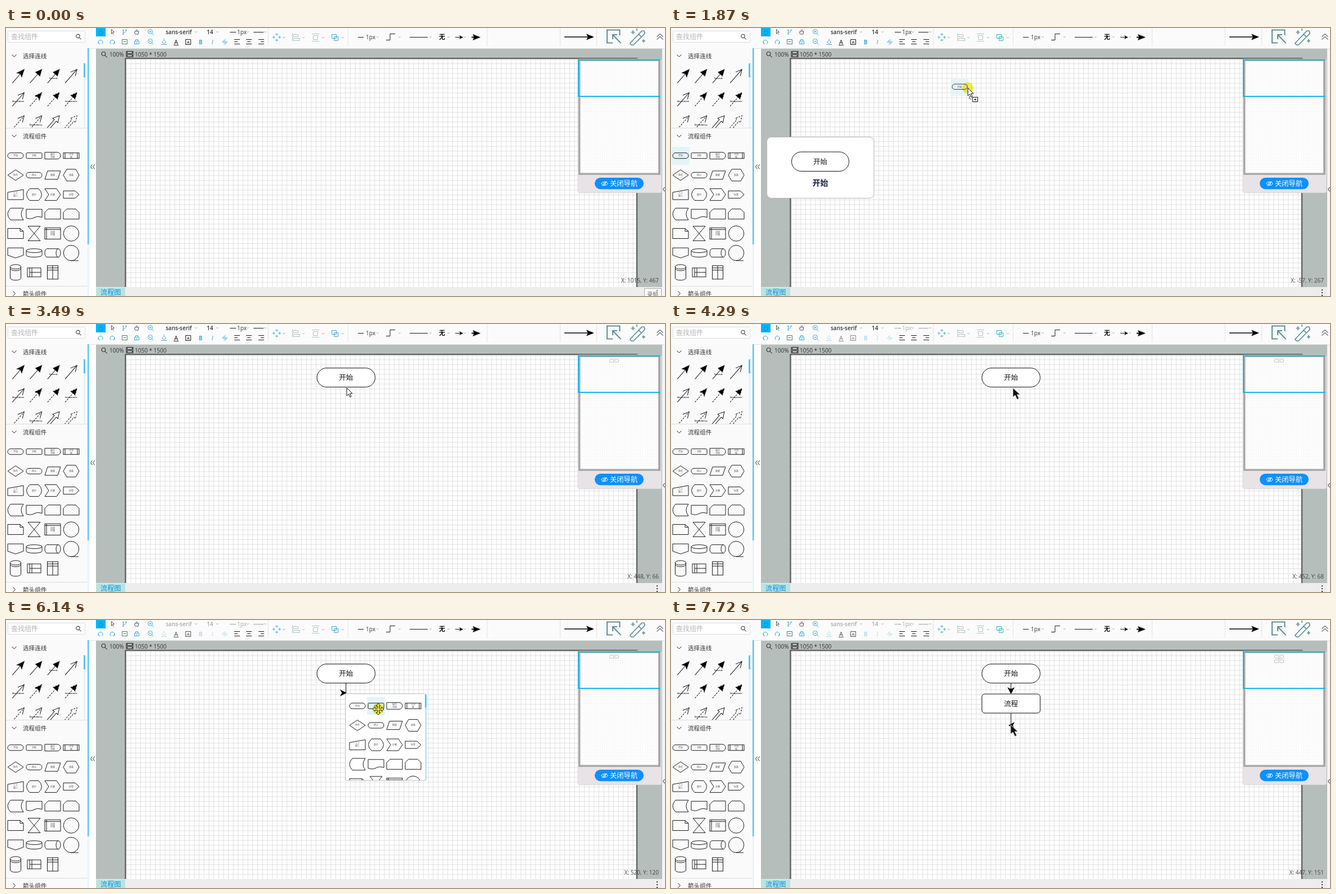
An HTML page for the animation above (7.99 s loop, 1172x478 px).

```html
<!DOCTYPE html>
<html lang="zh">
<head>
<meta charset="utf-8">
<title>流程图</title>
<style>
html, body { margin: 0; width: 100%; height: 100%; overflow: hidden; background: #fafafa; }
svg { display: block; }
text { font-family: "Open Sans", "Noto Sans CJK SC", "Noto Sans CJK", sans-serif; font-size: 10px; fill: #333; }
.zh { font-family: "Noto Sans CJK SC", "Noto Sans CJK", sans-serif; }
.mid { text-anchor: middle; }
.ink { fill: none; stroke: #1a1a1a; stroke-width: 1; }
.ink text { stroke: none; font-size: 4px; fill: #555; }
.solid { fill: #000; }
.blue { fill: none; stroke: #3aa9dc; stroke-width: 1; }
.blue text { stroke: none; fill: #3aa9dc; font-size: 11px; }
.teal { fill: none; stroke: #5d9099; stroke-width: 2; }
.caret { fill: none; stroke: #9aa; stroke-width: .9; }
.node { fill: #fff; stroke: #111; }
.hover { fill: #e3f4f7; }
.panel { fill: #fff; stroke: #b5b8b8; }
</style>
</head>
<body>
<svg id="stage" width="1172" height="478" viewBox="0 0 1172 478">
  <defs>
    <clipPath id="edgeClip"><path d="M0 60H137V178H0z"/></clipPath>
    <clipPath id="pickClip"><path d="M604 132H746V285.500H604z"/></clipPath>
    <pattern id="miniGrid" width="4" height="4" patternUnits="userSpaceOnUse"><path d="M0 .5H4M.5 0V4" stroke="#f7f7f7"/></pattern>
  </defs>

  <!-- workspace -->
  <path fill="#fff" d="M148 37H160V478H148z"/>
  <path fill="#b6bebb" d="M160 37H1167V462H160z"/>
  <path fill="#fff" d="M213 55H1122V462H213z"/>
  <path id="grid" fill="none" stroke="#dcdcdc" stroke-width=".87"/>
  <path fill="none" stroke="#646664" stroke-width="2.500" d="M212.500 462V54.300H1122V462"/>
  <circle class="ink" cx="173.500" cy="46" r="3.500"/><path class="ink" stroke-width="1.500" d="M176 49l4 3.500"/>
  <text x="184" y="50.500">100%</text>
  <path class="ink" d="M215.500 41.500h9v4h-9zM215.500 47.500h9v4h-9zM214 41v11M226 41v11"/>
  <text x="229" y="50.500">1050 * 1500</text>
  <path fill="#ededed" d="M160 462H1167V478H160z"/>
  <path fill="#b9e3df" d="M160 463H212V478H160z"/>
  <text class="zh" x="168" y="476" style="font-size:12.200px;fill:#0a8fe8;font-weight:500">流程图</text>

  <!-- sidebar -->
  <path fill="#fafafa" d="M0 0H144V478H0z"/>
  <rect x="3.500" y="5.500" width="137" height="20" rx="2" fill="#fff" stroke="#ddd"/>
  <text class="zh" x="9" y="20" style="font-size:12px;fill:#b4b4b4">查找组件</text>
  <circle class="ink" cx="128" cy="14.500" r="3.300"/><path class="ink" d="M130.500 17l3 3.500"/>
  <path fill="#e4f3fb" d="M138 63h3v115h-3zM145 386h2.500v92h-2.500z"/>
  <path fill="#5cc4f5" d="M138 63h3v25h-3zM145 36h2.500v350h-2.500z"/>
  <path stroke="#ddd" d="M0 178.500H144M0 460.500H144"/>
  <path class="ink" d="M10.500 47.500l4 4 4-4M10.500 190.500l4 4 4-4M12.500 469.500l4 4-4 4M153.500 243.500l-3 4 3 4M157.500 243.500l-3 4 3 4"/>
  <g style="font-weight:500">
    <text class="zh" x="30" y="53.500" style="font-size:10.600px">选择连线</text>
    <text class="zh" x="30" y="196.500" style="font-size:10.600px">流程组件</text>
    <text class="zh" x="30" y="477.500" style="font-size:10.600px">箭头组件</text>
  </g>
  <path class="hover" id="hoverStart" d="M1 212h32v32H1z"/>
  <path class="hover" id="hoverData" d="M67 246h32v32H67z"/>
  <g id="edges" class="ink" clip-path="url(#edgeClip)"></g>
  <g id="shapes" class="ink"></g>

  <!-- toolbar -->
  <path fill="#fbfbfb" d="M148 0H1172V37H148z"/>
  <path stroke="#e4e4e4" d="M148 36.500H1172M466.500 0V32M608.500 0V32M855.500 0V32M985.500 0V32M1050.500 0V32"/>
  <path fill="#08b2fa" d="M160 0H177V15H160z"/>
  <path fill="none" stroke="#0784c4" d="M165 8a3.500 3.500 0 0 1 6-2M171 6a3.500 3.500 0 0 1-5 5"/>
  <g class="blue">
    <path stroke="#555" d="M187.500 2.500v8l2-2 2 3M187.500 2.500l5 5h-3"/>
    <path d="M208.500 3v8M208.500 8q5 0 5-4M207 3.500h3M212 3.500h3M207 11h3"/>
    <path stroke="#557" d="M229.500 8v-3M231.500 7v-4M233.500 7v-4M235.500 8v-3M229 8q-2-1 1 3h5l1-5"/>
    <circle cx="256.500" cy="6.500" r="4"/><path d="M254.500 6.500h4M256.500 4.500v4M259.500 9.500l3 3"/>
    <circle cx="256.500" cy="23.500" r="4"/><path d="M254.500 23.500h4M259.500 26.500l3 3"/>
    <path d="M164.500 27.500a4 4 0 1 1 6 1M164.500 24v4h3M192.500 27.500a4 4 0 1 0-6 1M193 24v4h-3"/>
    <path stroke="#577" d="M206.500 20.500h9v8h-9zM208.500 24.500h5"/>
    <path d="M228.500 23.500h8v5h-8zM230.500 23.500v-3h4v3M231 26.500h3"/>
  </g>
  <g id="fontTools" style="font-weight:600"><text x="284" y="11">sans-serif</text><text x="357" y="11">14</text></g>
  <g id="letterTools" class="ink">
    <text x="302.500" y="28.500" class="mid" style="font-size:11px;fill:#111">A</text><path d="M298 30.500h9M319.500 20.500h9v9h-9z"/>
    <text x="324" y="28" class="mid" style="font-size:8px;fill:#111">A</text>
  </g>
  <g id="styleTools" class="blue">
    <path d="M277.500 25.500l4-4 3 4-3 2zM276 29.500h10M281 21v-2"/>
    <text x="346" y="29" class="mid" style="font-weight:700;font-size:10px">B</text>
    <text x="367" y="29" class="mid" style="font-style:italic">I</text>
    <text x="389" y="29" class="mid">S</text><path d="M384 25h10"/>
  </g>
  <g id="lineTools"><path class="ink" d="M398 7.500h11M440 7.500h18"/><text x="411" y="11">1px</text></g>
  <path class="ink" d="M406 20.500h10M406 24.500h6M406 28.500h10M427 20.500h10M429 24.500h6M427 28.500h10M449 20.500h10M453 24.500h6M449 28.500h10"/>
  <g class="blue" opacity=".65">
    <path stroke-width="1.400" d="M475 16.500h4M484 16.500h4M481.500 10v4M481.500 19v4M479 12l2.500-2 2.500 2M479 21l2.500 2 2.500-2M477 14l-2 2.500 2 2.500M486 14l2 2.500-2 2.500"/>
    <path stroke="#8aa" d="M509.500 9v15M511.500 11.500h8v4h-8zM511.500 18.500h11v4h-11zM544 10.500h13M544 23.500h13M546.500 13.500h8v7h-8z"/>
  </g>
  <path class="blue" d="M579.500 11.500h8v7h-8zM583.500 15.500h7v7h-7z"/>
  <path class="ink" d="M626 16.500h10M676 21.500h7v-11h9M718 16.500h32M799 16.500h10"/>
  <text x="640" y="20">1px</text>
  <text class="zh" x="770" y="20" style="font-weight:700;font-size:11px;fill:#111">无</text>
  <path class="solid" d="M813 16.500l-7-3.500 2 3.500-2 3.500zM844 16.500l-14-5.500 2 4.500h-4v2h4l-2 4.500z"/>
  <path stroke="#000" stroke-width="1.300" d="M993 16h45"/><path class="solid" d="M1046 16l-14-5.500 3 5.500-3 5.500z"/>
  <g class="teal">
    <path d="M1091.500 13V3.500h-22.500v23h10M1079 12l14.500 15M1079 20v-8h8"/>
    <path d="M1111 26l19-20q3-2 5 0t0 5l-19 19q-3 1-5-1t0-3zM1125 11l5 5M1115 4v7M1111.500 7.500h7M1122 1v4M1134 20v6M1131 23h6" stroke-width="1.700"/>
  </g>
  <path class="ink" stroke-width="1.500" d="M1157.500 15.500l5.500-5 5.500 5M1157.500 20.500l5.500-5 5.500 5"/>
  <path id="carets" class="caret"/>

  <!-- navigator -->
  <path fill="#f5f5f5" d="M1167 37H1172V478H1167z"/>
  <rect x="1017" y="55" width="149" height="239" rx="3" fill="#e7e3e7" stroke="#ccc" stroke-width=".6"/>
  <path fill="#a8a8a8" d="M1018 56H1164V262H1018z"/>
  <path fill="#fff" d="M1021.500 59H1160V258.500H1021.500z"/><path fill="url(#miniGrid)" d="M1021.500 59H1160V258.500H1021.500z"/>
  <g id="mini1" class="ink" opacity=".25"><rect x="1073.500" y="63" width="16" height="5" rx="1"/><path d="M1079 65.500h5"/></g>
  <g id="mini2" class="ink" opacity=".25"><rect x="1073.500" y="71" width="16" height="5" rx="1"/><path d="M1079 73.500h5M1081.500 68v3"/></g>
  <path fill="none" stroke="#14b4f0" stroke-width="2" d="M1164 56.500H1018V122H1164"/>
  <rect x="1047" y="267" width="87" height="20.500" rx="10.200" fill="#0d90fb"/>
  <path fill="none" stroke="#fff" d="M1058.500 277.500q6-7 12 0q-6 7-12 0M1060.500 282l8.500-9"/><circle cx="1064.500" cy="277.500" r="1.800" fill="none" stroke="#fff"/>
  <text class="zh" x="1074" y="281.700" style="font-size:12.300px;fill:#fff;font-weight:500">关闭导航</text>
  <path class="ink" d="M1171.500 284l-3 3.500 3 4"/>
  <text id="coord" x="1161" y="454" text-anchor="end" style="fill:#444"></text>
  <path fill="#333" d="M1157 466h2v2h-2zM1157 471h2v2h-2zM1157 476h2v2h-2z"/>
  <g id="tip"><rect x="1135.500" y="464.500" width="30" height="20" fill="#fafafa" stroke="#aaa"/><text class="zh" x="1140" y="479" style="fill:#666">录频</text><path fill="#777" d="M1157 467h2v2h-2z"/></g>

  <!-- diagram -->
  <g id="start"><rect class="node" x="553" y="78.500" width="103.500" height="34" rx="17"/><text class="zh mid" x="604.700" y="100" style="font-size:12.400px;fill:#111">开始</text></g>
  <g id="step"><rect class="node" x="553" y="132" width="103.500" height="34" rx="5"/><text class="zh mid" x="604.700" y="153.500" style="font-size:12.400px;fill:#111">流程</text></g>
  <g id="link"><path class="ink" d="M604.700 112.500V127"/><path class="solid" d="M604.700 132l-6.500-12 6.500 3 6.500-3z"/></g>
  <g id="wire"><path class="ink"/><path class="solid"/></g>
  <g id="picker">
    <rect x="603.500" y="131.500" width="144" height="154.500" rx="3" fill="#fff" stroke="#b9bcbc"/>
    <path fill="#b4e0f7" d="M745.500 133h2.500v152h-2.500z"/><path fill="#5cc4f5" d="M745 133h3v23h-3z"/>
    <path class="hover" id="hoverStep" d="M642 137h32v32h-32z"/>
    <g clip-path="url(#pickClip)"><use href="#shapes" x="608" y="-74.500"/></g>
  </g>
  <g id="panelData">
    <rect class="panel" x="170.500" y="235.500" width="173" height="117" rx="8"/>
    <path class="node" d="M227 262H299.500L287 304.500H214.500z"/>
    <text class="zh mid" x="257" y="287.500" style="font-size:12.200px;fill:#111">数据</text>
    <text class="zh mid" x="257" y="330" style="font-size:14px;fill:#223;font-weight:500">数据</text>
  </g>
  <g id="panelStart">
    <rect class="panel" x="170.500" y="194.500" width="190.500" height="109" rx="8"/>
    <rect class="node" x="214.500" y="221" width="102" height="34.500" rx="17.200"/>
    <text class="zh mid" x="265.500" y="242.500" style="font-size:12.400px;fill:#111">开始</text>
    <text class="zh mid" x="265.500" y="281" style="font-size:14px;fill:#1d1f4a;font-weight:700">开始</text>
  </g>

  <!-- pointers, drawn around their hot spot -->
  <g id="pointer">
    <g id="ghost" opacity=".85"><path class="hover" d="M-31-18h32v32h-32z"/><rect class="ink" x="-28" y="-7" width="27" height="9.500" rx="4.700"/><text class="mid" x="-14.500" y="-.5" style="font-size:4px">开始</text></g>
    <path id="move" fill="#fff" stroke="#222" d="M0-10l4 4h-2.500v4.500H6V-4l4 4-4 4V1.500H1.500V6H4l-4 4-4-4h2.500V1.500H-6V4l-4-4 4-4v2.500h4.500V-6H-4z"/>
    <circle id="halo" r="10" fill="#f5ec3c" opacity=".85"/>
    <path id="arrow" fill="#fff" stroke="#111" d="M0 0V14L3.300 11 6 16.500 8 15.500 5.500 10H10z"/>
    <path id="copy" fill="#fff" stroke="#111" d="M8.500 16.500h9v8h-9zM13 18.500v4M11 20.500h4M2 15.500h2M2.500 17v2M4 19.500h2"/>
    <path id="black" fill="#111" stroke="#ddd" stroke-width="1" d="M-1-1V15.500L3 12 6.500 19.500 10 18 6.500 11H12z"/>
  </g>
</svg>
<script>
const $ = id => document.getElementById(id);

// paper grid: 10 units at 86.7 % zoom
const UNIT = 8.67;
let grid = '';
for (let x = 213.5 + UNIT; x < 1121; x += UNIT) grid += `M${x.toFixed(2)} 56V462`;
for (let y = 55 + UNIT; y < 462; y += UNIT) grid += `M214 ${y.toFixed(2)}H1121`;
$('grid').setAttribute('d', grid);

$('carets').setAttribute('d', [[338, 7], [376, 7], [430, 7], [461, 7], [494, 17], [529, 17], [564, 17],
  [599, 17], [661, 16], [700, 16], [755, 16], [787, 16], [816, 16]]
  .map(([x, y]) => `M${x - 2} ${y - 1}l2 2 2-2`).join(''));

// connector palette
const heads = {
  notch: '<path d="M-16 0H8"/><path class="solid" d="M16 0L3-5.5 6 0 3 5.5z"/>',
  full: '<path d="M-16 0H6"/><path class="solid" d="M16 0L5-5V5z"/>',
  open: '<path d="M-16 0H16"/><path stroke-dasharray="none" d="M5-5.500L16 0 5 5.500"/>',
  hollow: '<path d="M-15-2.200H5V-6L16 0 5 6V2.200H-15"/>'
};
const edges = ['notch', 'full', 'full||Extends', 'open', 'open||Association', 'notch|3 2', 'full|3 2', 'full|3 2|Implements',
  'open|3 2', 'open|3 2|Dependency', 'hollow', 'hollow|3 2'];
$('edges').innerHTML = edges.map((spec, i) => {
  const [head, dash = '', label = ''] = spec.split('|');
  return `<g transform="translate(${21.8 + i % 4 * 31.3} ${86 + (i >> 2) * 41.3})">
    <g transform="rotate(-49)" stroke-dasharray="${dash}">${heads[head]}</g>
    <text class="mid" y="5" style="font-size:3.800px;fill:#111;font-weight:600">${label}</text></g>`;
}).join('');

// shape palette: outline (centred on its cell) and caption lines
const box = (w, h, r = 0) => `<rect x="${-w / 2}" y="${-h / 2}" width="${w}" height="${h}" rx="${r}"/>`;
const path = d => `<path d="${d}"/>`;
const round = '<circle r="13.700"/>';
const shapes = [
  [box(28, 10, 5), '开始'],
  [box(28, 10, 1.5), '流程'],
  [path('M-14-6H8a6 6 0 0 1 0 12H-14z'), '临时', '流程'],
  [box(28, 10) + path('M-11-5V5M11-5V5'), '子流', '程'],
  [path('M-14 0L0-9.500 14 0 0 9.500z'), '条件'],
  [box(28, 10, 5), '终止'],
  [path('M-9-7.500H14L9 7.500H-14z'), '数据'],
  [path('M-14 0L-8-10.500H8L14 0 8 10.500H-8z'), '准备'],
  [path('M-14-4L14-9V9H-14z'), '人工', '输入'],
  [path('M-8-10.500H8Q19 0 8 10.500H-8Q-19 0-8-10.500z'), '展示'],
  [path('M-14-10.500H7L14 0 7 10.500H-14L-7 0z'), '步骤'],
  [path('M-14-6.500H7L14 0 7 6.500H-14z'), '标签'],
  [path('M-9-10.500H14Q6 0 14 10.500H-9Q-19 0-9-10.500z')],
  [path('M-14-8.500H14V6Q6 3 0 6.500T-14 7z')],
  [path('M-8-9H14V9H-14V-3z')],
  [path('M-8-9H8L14-3V9H-14V-3z')],
  [path('M-14-9H8L14-4V9H-14zM8-9V-4H14')],
  [path('M-11-13H11L-11 13H11z')],
  [box(28, 20) + path('M-14-7H14M-11-10V10'), '内部', '存储'],
  [round],
  [path('M-14-9H14V4L0 9-14 4z')],
  [path('M-14-4V4a14 3.500 0 0 0 28 0V-4a14 3.500 0 0 0-28 0a14 3.500 0 0 0 28 0')],
  [path('M-10-7.500H10a4 7.500 0 0 1 0 15H-10a4 7.500 0 0 1 0-15M10-7.500a4 7.500 0 0 0 0 15')],
  [round + path('M0 13.700H13')],
  [path('M-9.500-10V10a9.500 4 0 0 0 19 0V-10a9.500 4 0 0 0-19 0a9.500 4 0 0 0 19 0M-9.500-7a9.500 4 0 0 0 19 0')],
  [box(24, 16) + path('M-8-8V8M-4-8V8M-8 0H12')],
  [box(19, 24) + path('M-9.500-8H9.500M-9.500-4H9.500M0-12V12')]
];
$('shapes').innerHTML = shapes.map(([art, ...lines], i) => {
  const top = lines.length > 1 ? -.8 : 1.5;
  const caption = lines.map((s, k) => `<text class="zh mid" y="${top + k * 4.6}">${s}</text>`).join('');
  return `<g transform="translate(${17 + i % 4 * 33} ${227.7 + (i >> 2) * 34.7})">${art}${caption}</g>`;
}).join('');

// time, pointer x, y, visible parts, readout ('' keeps the last one)
const drag = 'arrow copy halo ghost hoverStart panelStart';
const one = 'start mini1 ';
const two = one + 'step mini2 link ';
const pick = one + 'wire picker ';
const steps = [
  [0, 0, 0, 'tip', '1015, 467'],
  [260, 524, 231, 'arrow', '354, 201'],
  [540, 172, 285, 'arrow', '-52, 264'],
  [810, 63, 262, 'move hoverData panelData', '-57, 267'],
  [1070, 25, 233, 'move hoverStart panelStart', ''],
  [1340, 25, 233, 'move halo hoverStart panelStart', ''],
  [1610, 290, 165, drag, ''],
  [1870, 528, 107, drag, ''],
  [2140, 574, 103, drag, ''],
  [2400, 602, 98, drag, ''],
  [2670, 604, 104, 'arrow start panelStart', ''],
  [2950, 605, 129, 'arrow start panelStart', ''],
  [3210, 606, 124, one + 'arrow', '448, 78'],
  [3490, 606, 114, one + 'arrow', '448, 66'],
  [3760, 607, 110, one + 'black', '449, 62'],
  [4020, 608, 106, one + 'black dim', '450, 57'],
  [4290, 609, 115, one + 'black dim', '452, 68'],
  [4550, 607, 114, one + 'black off', '449, 66'],
  [4810, 605, 112, one + 'black off', '447, 64'],
  [5080, 605, 126, one + 'black halo wire off', '447, 80'],
  [5350, 606, 133, pick + 'arrow off', '448, 88'],
  [5610, 628, 146, pick + 'arrow off', '474, 103'],
  [5880, 652, 156, pick + 'move hoverStep off', '501, 115'],
  [6140, 662, 159, pick + 'move halo hoverStep off', '520, 120'],
  [6410, 662, 159, two + 'arrow off', ''],
  [6680, 642, 164, two + 'arrow off', '490, 124'],
  [6930, 618, 168, two + 'arrow off', '462, 129'],
  [7190, 605, 167, two + 'black off', '447, 128'],
  [7460, 605, 176, two + 'black halo wire off', '447, 138'],
  [7720, 605, 188, two + 'black wire off', '447, 151']
];
const LOOP = 7990;
const parts = ['tip', 'hoverStart', 'hoverData', 'hoverStep', 'panelData', 'panelStart', 'start', 'step', 'link', 'wire',
  'picker', 'mini1', 'mini2', 'ghost', 'halo', 'arrow', 'copy', 'black', 'move'];
const [wireLine, wireHead] = $('wire').children;
$('halo').style.mixBlendMode = 'multiply';

function drawWire(y, second, picking) {
  const end = picking ? 130 : y;
  wireLine.setAttribute('d', `M604.700 ${second ? 166 : 112.5}V${end}`);
  wireHead.setAttribute('d', second
    ? `M600 ${end}l11-6-3 6 3 6z`
    : `M606 ${end}l-12-6 3.500 6-3.500 6z`);
}

function show(i) {
  const [, x, y, names] = steps[i];
  const on = new Set(names.split(' '));
  for (const id of parts) $(id).style.display = on.has(id) ? '' : 'none';
  $('pointer').setAttribute('transform', `translate(${x} ${y})`);
  if (on.has('wire')) drawWire(y, on.has('step'), on.has('picker'));

  const dim = on.has('dim'), off = on.has('off');
  $('fontTools').style.opacity = off ? .4 : 1;
  $('letterTools').style.opacity = dim ? .5 : off ? .75 : 1;
  $('styleTools').style.opacity = $('lineTools').style.opacity = dim || off ? .4 : 1;

  let k = i;
  while (!steps[k][4]) k--;
  const [cx, cy] = steps[k][4].split(', ');
  $('coord').textContent = `X: ${cx}, Y: ${cy}`;
}

const begin = performance.now();
let shown = -1;
function tick() {
  const t = (performance.now() - begin) % LOOP;
  const i = steps.findLastIndex(s => s[0] <= t);
  if (i !== shown) show(shown = i);
  requestAnimationFrame(tick);
}
tick();
</script>
</body>
</html>
```
